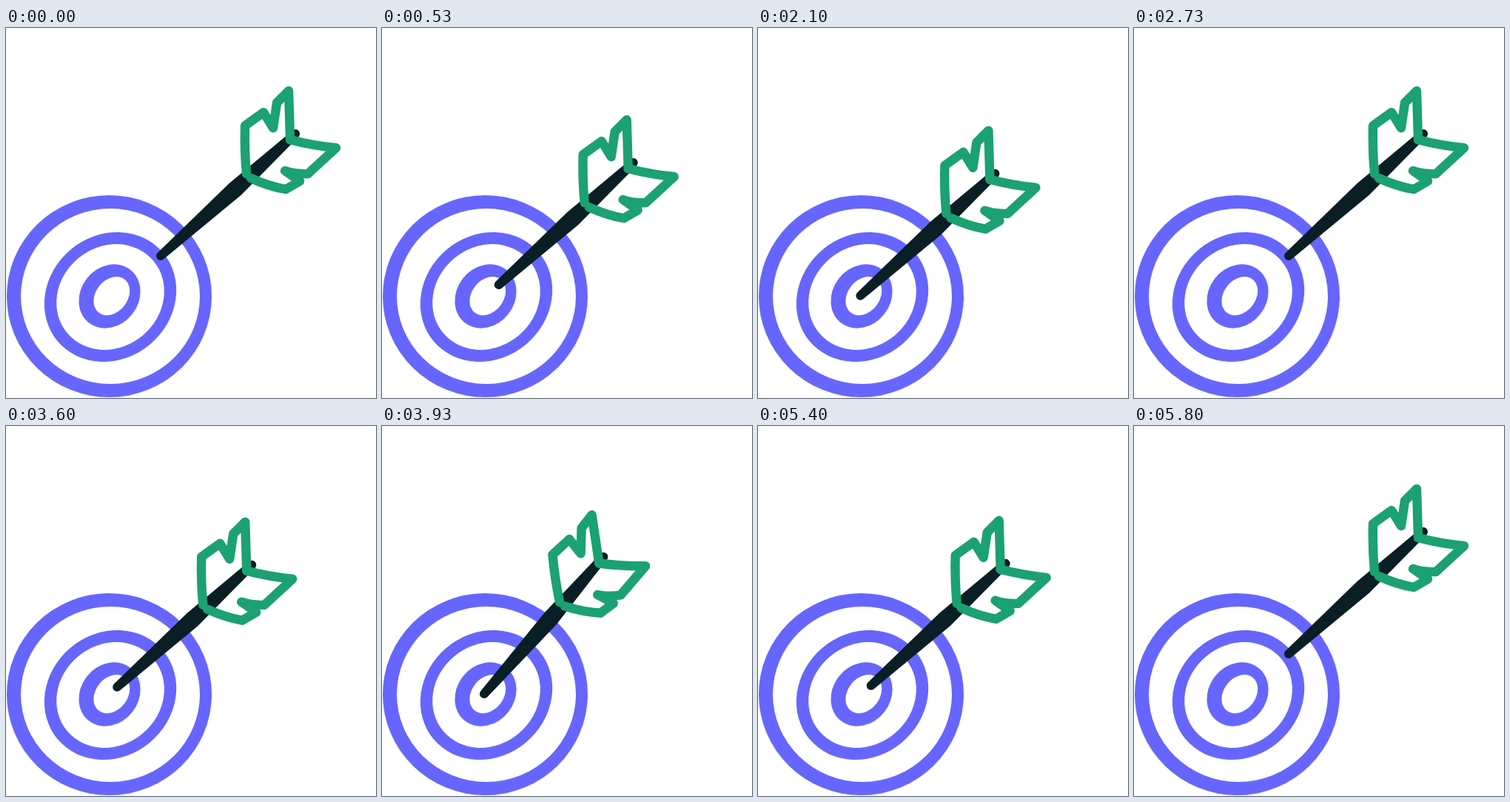
Recreate the animation shown at these times as an HTML page. Size 500 by 500 pixels, loop 6.11 s.

```html
<!DOCTYPE html>
<html lang="en">
<head>
<meta charset="utf-8">
<title>Arrow hitting a target</title>
<style>
  html, body { margin: 0; width: 100%; height: 100%; overflow: hidden; background: #fff; }
  svg { display: block; width: 100%; height: 100%; }
  .disc { fill: #6666ff; }
  .hole { fill: #fff; }
  .shaft { fill: #0a1e26; stroke: #0a1e26; stroke-linecap: round; stroke-linejoin: round; }
  .feather { fill: none; stroke: #1ba172; stroke-width: 12.4; stroke-linecap: round; stroke-linejoin: round; }
</style>
</head>
<body>
<svg viewBox="0 0 500 500">
  <g transform="translate(139.5 362.5)">
    <ellipse class="disc" rx="138.5" ry="136.5"/>
    <ellipse class="hole" cx="1.5" rx="121" ry="118.5"/>
  </g>
  <g transform="translate(141 363.5) rotate(-40)">
    <ellipse class="disc" rx="93" ry="83.5"/>
    <ellipse class="hole" rx="76" ry="68"/>
  </g>
  <g transform="translate(140 362.5) rotate(-52)">
    <ellipse class="disc" rx="45.5" ry="39"/>
    <ellipse class="hole" cx="2" cy="2" rx="28.500" ry="21.500"/>
  </g>
  <g id="arrow">
    <path class="shaft" stroke-width="12" d="M209 308L306 214L384 149L391 143L384 150L313 222Z"/>
    <path class="feather" d="M325 197Q322 165 323 132L348 114L361 135L366 101L382 85L384 151"/>
    <path class="feather" d="M384 151Q415 159 446 162L408 197Q392 198 377 193L397 207L378 218Q355 214 331 203"/>
  </g>
</svg>
<script>
const LOOP = 6110;
const FRAME = 100 / 3;
const SECOND = 91;       // frame at which the second shot's cycle begins
const CYCLE = 91.4;      // length of a cycle in frames
const LEAD = 0.5;        // the first cycle starts slightly under way
const TIP = [209, 308];
const REACH = [-71, 54];
const SWING = 8;

const span = (f, from, to) => Math.min(1, Math.max(0, (f - from) / (to - from)));
const easeIn = u => u * u;
const easeInOut = u => (1 - Math.cos(Math.PI * u)) / 2;

// Accelerate into the centre, quiver, then pull back out.
function pose(f) {
  const shift = easeIn(span(f, 8, 18)) - easeIn(span(f, 62, 82));
  const angle = SWING * (easeInOut(span(f, 18, 23))
    - 2 * easeInOut(span(f, 23, 28)) + easeInOut(span(f, 28, 33)));
  return { shift, angle };
}

const arrow = document.getElementById('arrow');
function draw(ms) {
  const frame = Math.floor((ms % LOOP + 3.4) / FRAME);
  const { shift, angle } = pose(frame + LEAD - (frame < SECOND ? 0 : CYCLE));
  const [dx, dy] = REACH.map(v => v * shift);
  arrow.setAttribute('transform', `translate(${dx} ${dy}) rotate(${angle} ${TIP})`);
}

let start;
function tick(now) {
  start ??= now;
  draw(now - start);
  requestAnimationFrame(tick);
}
draw(0);
requestAnimationFrame(tick);
</script>
</body>
</html>
```
